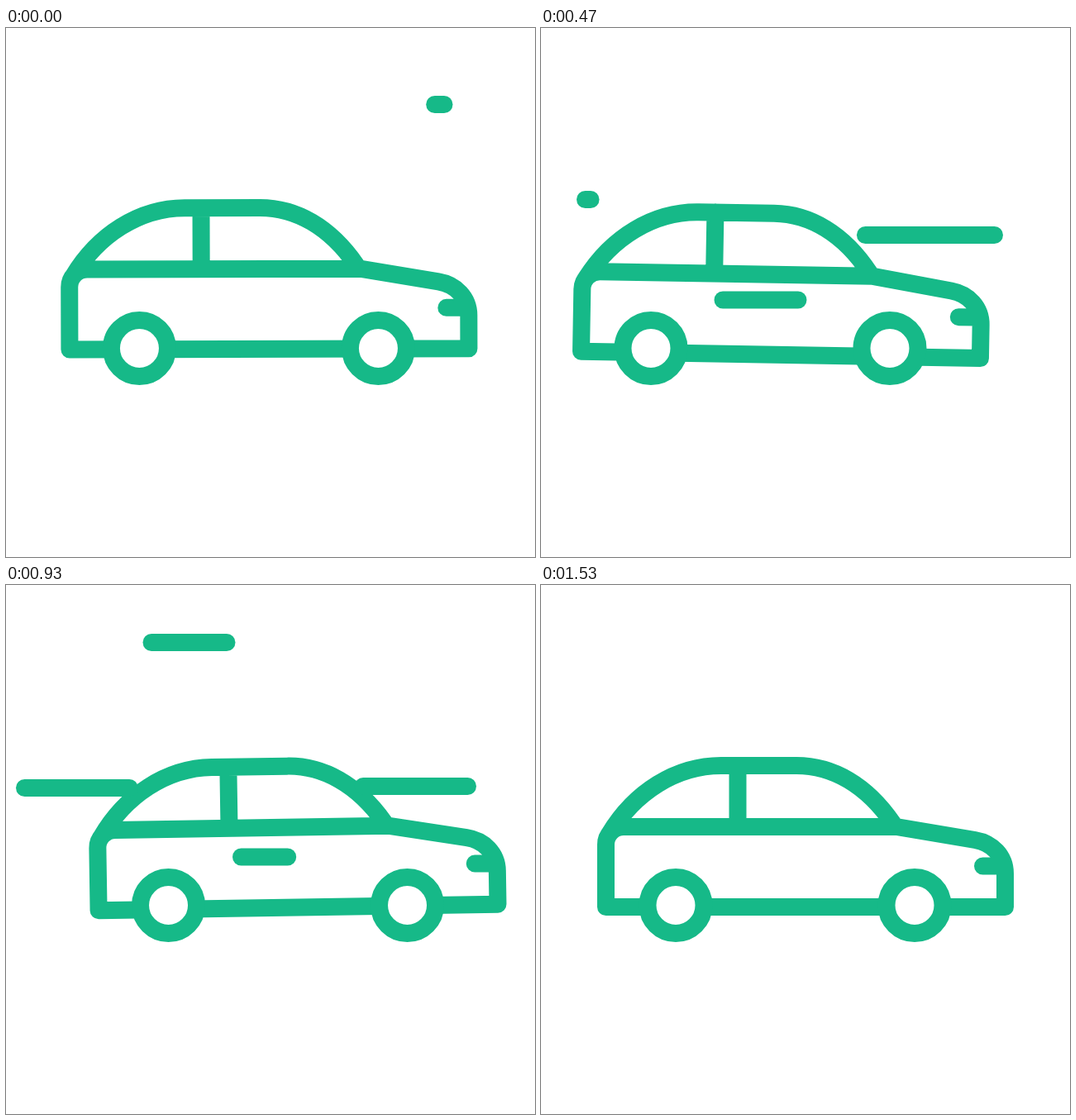
Write an HTML page with a canvas that moves like this. It is 640 by 640 pixels and loops after 1670 ms.

```html
<!DOCTYPE html>
<html lang="en">
<head>
<meta charset="utf-8">
<title>Car</title>
<style>
  html, body { margin: 0; width: 100%; height: 100%; overflow: hidden; background: #fff; }
  canvas { display: block; width: 100vw; height: 100vh; }
</style>
</head>
<body>
<canvas id="stage" width="640" height="640"></canvas>
<script>
const ctx = document.getElementById('stage').getContext('2d');
const GREEN = '#16b988';
const LOOP = 1670;
const STEP = 100 / 3;
const LAST_STEP = 49;
const STREAK_LENGTH = 200;
const PIVOT = { x: 320, y: 389.5 };

const SHELL = 'M78.5 389.5V314C78.5 302 88 292.5 100 292.5H430L525 308.5' +
  'C546 312 561.5 328 561.5 349V389.5Z';
const ROOF = 'M82.8 301C113 251 163 218.5 218 218.5H309C353 218.5 394 242 425.5 288';
const PILLAR = 'M238 218.5V292.5';
const HEADLIGHT = 'M534.5 340H556';
const BODY = new Path2D(SHELL + ROOF + PILLAR + HEADLIGHT);

// Smooth 0 to 1 between two steps.
function ease(n, from, to) {
  const u = Math.min(1, Math.max(0, (n - from) / (to - from)));
  return u * u * (3 - 2 * u);
}

// Smooth rise to 1 at the peak and back to 0.
function bump(n, peak) {
  return 1 - ease(Math.abs(n - peak), 0, 8);
}

// The car falls back, surges forward, then settles.
function shiftAt(n) {
  return -45.5 * ease(n, 0, 11.7) + 86 * ease(n, 11.7, 25) - 40.5 * ease(n, 25, 41.3);
}

function bounceAt(n) {
  return -15.3 * bump(n, 8) + 8.3 * bump(n, 15) - 9.9 * bump(n, 21) + 6.3 * bump(n, 36);
}

// Two rocking cycles of 20 steps; the nose lifts half as far in the second.
function tiltAt(n) {
  const rock = (start, lift) => bump(n, start + 16) - lift * bump(n, start + 8);
  return 1.05 * (rock(0, 2) + rock(20, 1));
}

// A line grows leftwards from x, then its tail catches up.
function drawStreak(age, x, y) {
  const head = ease(age, 0, 9);
  const tail = ease(age, 5.9, 14.2);
  if (age <= 0 || tail === 1) return;
  ctx.beginPath();
  ctx.moveTo(x - STREAK_LENGTH * tail, y);
  ctx.lineTo(x - STREAK_LENGTH * head, y);
  ctx.stroke();
}

function drawStreaks(n) {
  drawStreak(n, 530, 92.5);
  drawStreak(n - 2, 253.5, 207.5);
  drawStreak(n - 5, 420, 329);
  drawStreak(n - 7, 589, 250.5);

  drawStreak(n - 18, 484.5, 329);
  drawStreak(n - 19, 376, 69.5);
  drawStreak(n - 20, 222.5, 245.5);
  drawStreak(n - 24, 558.5, 243.5);
}

function drawBody(n) {
  ctx.save();
  ctx.translate(PIVOT.x, PIVOT.y + bounceAt(n));
  ctx.rotate(tiltAt(n) * Math.PI / 180);
  ctx.translate(-PIVOT.x, -PIVOT.y);
  ctx.stroke(BODY);
  ctx.restore();
}

function drawWheel(x) {
  ctx.beginPath();
  ctx.arc(x, 387.5, 34, 0, Math.PI * 2);
  ctx.fill();
  ctx.stroke();
}

function draw(time) {
  const n = Math.min(LAST_STEP, Math.floor((time % LOOP + 4) / STEP)) + 1.3;

  ctx.fillStyle = '#fff';
  ctx.fillRect(0, 0, 640, 640);
  ctx.strokeStyle = GREEN;
  ctx.lineWidth = 21;
  ctx.lineCap = ctx.lineJoin = 'round';

  ctx.save();
  ctx.translate(shiftAt(n), 0);
  drawBody(n);
  drawWheel(163);
  drawWheel(452);
  ctx.restore();
  drawStreaks(n);
}

let begin = null;
function tick(now) {
  if (begin === null) begin = now;
  draw(now - begin);
  requestAnimationFrame(tick);
}
draw(0);
requestAnimationFrame(tick);
</script>
</body>
</html>
```
